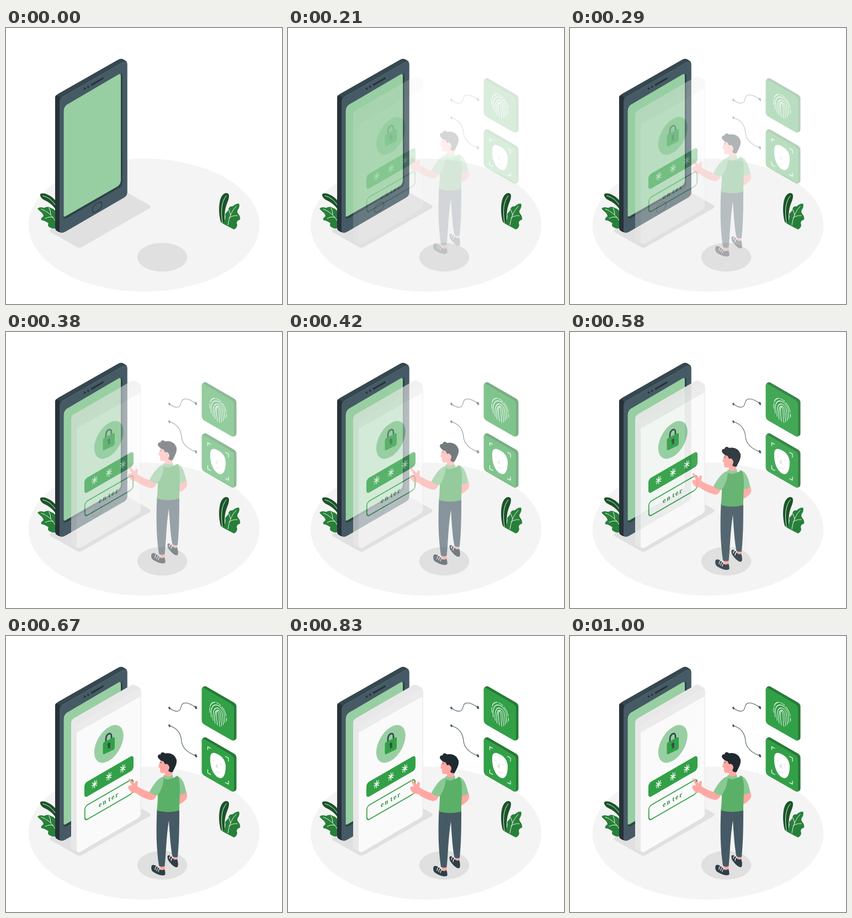
An HTML page that plays this animation: 500x500 px, repeating every 1040 ms.

```html
<!DOCTYPE html>
<html lang="en">
<head>
<meta charset="utf-8">
<title>Sign-in scene</title>
<style>
  html, body { margin: 0; width: 100%; height: 100%; overflow: hidden; background: #fff; }
  svg { display: block; width: 100%; height: 100%; }
  .line { fill: none; stroke-linecap: round; stroke-linejoin: round; }
  .white { stroke: #fff; }
  text { font: bold 11px "Noto Serif", "Liberation Serif", serif; letter-spacing: 2px; }
</style>
</head>
<body>
<svg viewBox="0 0 500 500">
  <defs>
    <g id="card">
      <path fill="#267a36" d="M354.500 98Q355.500 90 362 91L413 120.500Q417.500 123 417.500 128V184Q417.500 188 412 189.500Z"/>
      <path fill="#32a047" d="M354.500 98Q354.500 92 360 95L408 123Q413 126 413 131V186Q413 191.500 408 188.500L360 161Q354.500 158 354.500 152Z"/>
    </g>
    <path id="star" class="line white" stroke-width="1.400" d="M0-6.500V6.500M-5.500 0H5.500M-4.500-4.500L4.500 4.500M-4.500 4.500L4.500-4.500"/>
  </defs>

  <!-- Floor and shadows -->
  <ellipse cx="250" cy="357" rx="209" ry="120.500" fill="#f4f4f4"/>
  <path fill="#e0e0e0" d="M81 365L203 295Q210 292 218 297L260 321Q264 324 259 327L139 396Q133 400 127 396L81 370Q78 368 81 365Z"/>
  <ellipse cx="283" cy="415.300" rx="45.300" ry="26" fill="#e0e0e0"/>

  <!-- Plants -->
  <path fill="#1a5428" d="M62 301C66 297 80 301 90 313V329C84 319 76 315 68 311Q61 306 62 301Z"/>
  <path fill="#278038" d="M57 327Q62 323 69 326Q76 322 81 326Q87 327 91 334V362Q85 365 79 361Q74 358 77 354Q71 349 64 348Q62 345 68 341Q67 336 63 333Q59 330 57 327Z"/>
  <path fill="#1a5428" d="M389.500 352C384 336 384 302 398 299C406 298 405 307 401 316C395 331 396 342 396 354Z"/>
  <path fill="#278038" d="M392 354Q399 348 397 337Q401 332 403 330Q403 322 411 323Q416 318 422 318Q424 322 421 328Q417 332 421 337Q425 342 424 347Q418 349 418 353Q421 361 413 365Z"/>
  <path class="line white" stroke-width=".9" d="M67 304Q81 307 91 323M64 328Q80 334 90 350M78 326Q81 331 81 338M71 345Q78 341 85 343
    M399 304C390 315 389 332 392 352M417 323Q405 335 402 357M404 330Q406 336 407 339M404 344Q411 339 419 340"/>

  <!-- Phone -->
  <path fill="#37474f" d="M89 128Q89 122.500 94 119.500L203 57.500Q208 54.500 213 57L217 59.500Q219.500 61 219.500 66V298Q219 304 214 307L108 368.500Q102 372 97 370L92 367.500Q89 365.500 89 360Z"/>
  <path fill="#263238" d="M89 127Q89 123 91 121.500L99 126Q97 129 97 134V370L92 367.500Q89 365.500 89 360Z"/>
  <path fill="#455a64" d="M97 135Q97 128 103 124.500L212 62Q219.500 58 219.500 66V298Q219.500 304 214 307L108 368.500Q97 374.500 97 364Z"/>
  <path class="line" stroke="#607d8b" stroke-width=".6" d="M99 128Q100 126 103 124.500L212 62"/>
  <path fill="#2f4149" d="M104 151Q104 143 110 139L205 84Q211 81 211 87V279Q211 286 206 289L111 344Q104 347 104 342Z"/>
  <path fill="#98cfa2" d="M104.500 151Q104.500 143 110 139L204 84Q208 82 208 86V276Q208 283 202 287L108 341Q104.500 343 104.500 340Z"/>
  <g fill="#263238">
    <ellipse cx="142.500" cy="110" rx="1.700" ry="2"/>
    <ellipse cx="148.700" cy="106.500" rx="1.700" ry="2"/>
    <path class="line" stroke="#263238" stroke-width="3" d="M155 103L175.500 91.300"/>
  </g>
  <rect class="line" transform="matrix(.866 -.5 0 1 165 324.500)" x="-10" y="-7" width="20" height="14" rx="7" stroke="#263238" stroke-width="1.200"/>

  <g class="fade">
    <!-- Floating screen -->
    <path fill="#e8e8e8" d="M118 158Q118 152 123 149L226 89.500Q230 87 234 89L241 93Q244.500 95 244.500 100V317Q244.500 323 239 326L138 390Q133 393 128 390L121 387Q118 385 118 381Z"/>
    <path fill="#fafafa" d="M128 172V386Q128 394 136 390L239 330Q244.500 326 244.500 320V106Z"/>
    <path fill="#ebebeb" d="M128 175V167Q128 161 133 158L238 97Q244.500 94 244.500 101V109Z"/>
    <path class="line" stroke="#e8e8e8" d="M244 105V320"/>
    <circle transform="matrix(.866 -.5 0 1 186.300 195.500)" r="30.600" fill="#98cfa2"/>
    <path class="line" stroke="#37474f" stroke-width="2.800" d="M181 194V187C181 177 191 173 191 181V189"/>
    <path fill="#32a047" d="M175.500 196Q175.500 193.500 178 192L194.500 183.500Q197 182.500 197 185V202Q197 204.500 195 206L178 214Q175.500 215 175.500 212Z"/>
    <path fill="#37474f" d="M183.500 198Q184 194 187 193Q190 193 188.500 198L189 202L184 204.500L185.500 200Z"/>
    <g transform="matrix(.866 -.5 0 1 186.500 254.500)">
      <rect x="-51.400" y="-13.500" width="102.800" height="27" rx="6" fill="#32a047"/>
      <use href="#star" x="-30" y="-1"/>
      <use href="#star"/>
      <use href="#star" x="29"/>
    </g>
    <g transform="matrix(.866 -.5 0 1 186.500 296.500)">
      <rect class="line" x="-50.500" y="-13" width="101" height="26" rx="6" stroke="#32a047" stroke-width="2"/>
      <text x="0" y="3.500" dx="0 0 2.500" text-anchor="middle" fill="#2b8a3e">enter</text>
    </g>

    <!-- Connectors -->
    <g class="line" stroke="#455a64" stroke-width="1.100">
      <path d="M296 130.500C305 137 315 140 317 129C318.500 119 328 118 344 129.500"/>
      <path d="M296 162.500C311 167 317 178 318 190C319 203 328 211 344 217"/>
    </g>
    <g fill="#455a64">
      <ellipse cx="296" cy="130.500" rx="1.700" ry="2.500" transform="rotate(-25 296 130.500)"/>
      <ellipse cx="344" cy="129.500" rx="2" ry="3" transform="rotate(-25 344 129.500)"/>
      <ellipse cx="296" cy="162.500" rx="1.700" ry="2.500" transform="rotate(-25 296 162.500)"/>
      <ellipse cx="344" cy="217" rx="2" ry="3" transform="rotate(-25 344 217)"/>
    </g>

    <!-- Fingerprint and face cards -->
    <use href="#card"/>
    <use href="#card" y="92.500"/>
    <g class="line white" stroke-width="1.100" transform="matrix(.866 .5 0 1 384 141)">
      <path stroke-dasharray="9 3 16 3" d="M-17 6C-21-26 19-28 18 4"/>
      <path d="M-14 13C-19-21 14-23 14 0V9"/>
      <path d="M-10 17C-14-15 10-17 10 0L11 14"/>
      <path d="M-6 20C-10-11 6-12 6 1Q6 10 8 18"/>
      <path d="M-1 21C-4 10-4-5 0-5S1 10 4 21"/>
    </g>
    <path class="line white" stroke-width="1.100" d="M365.500 206V200.500L370.500 203.500M397.500 218L403 221V227M365.500 242V248L371 251M397.500 265.500L403 268.500V262.500"/>
    <path fill="#fff" d="M370 221C370 213 374 210 381 213C391 217 397 224 398 235C398 249 395 257 389 257.500C379 257 369 241 370 221Z"/>
    <g class="line" stroke="#e0e0e0" stroke-width="1.200">
      <path d="M375 225.500L378 226.500M388 232L391 233.500M381 245Q384 248 387 248"/>
      <path fill="#e0e0e0" stroke="none" d="M383 230L384 240L379 237Z"/>
    </g>
  </g>

  <!-- Visitor -->
  <g class="fade" id="man">
    <g fill="#ffa8a3">
      <path d="M277 414H288L287 427L279 425ZM302 398H311L310 410L303 406Z"/>
      <path d="M314 287L327 282Q330 292 325 297Q320 302 314 305Z"/>
      <path d="M221.500 259Q223 257 226 260L233 267L235 263Q237 261 239 264L238 272Q250 280 262 283L274 284Q271 298 262 297Q246 293 235 284Q226 285 222 276Q220 272 223 271L228 270Z"/>
      <path d="M280 222C279 228 277 232 276 237L279 239Q278 245 281 248L288 248V256Q294 260 301 255L302 228Z"/>
    </g>
    <path fill="#2f3e46" d="M263.500 416.500C266 412.500 271 415.500 276 419Q281 427 287 422Q289 427 288.500 432C284 435.500 275 432 270 429Q261.500 426 263.500 416.500ZM292.500 399C294 395 299 398 302 402Q305 407 310 404Q313 412 311 418C307 421 300 414 297 410Q292 405 292.500 399Z"/>
    <path class="line white" stroke-width="1.100" d="M274 416Q270 418 270 423M277 418Q273 421 273 425M280 421Q276 423 276 427M299 398Q296 400 296 403M302 401Q299 403 299 407"/>
    <path fill="#455a64" d="M273.500 314C272 350 272 382 277 416Q283 419.500 287.500 416.500C290 395 290 366 295 334C297 362 298 382 301.500 399Q306 402 311 400C313.500 375 314 350 314 314Z"/>
    <path fill="#8ac994" d="M286 254C275 257 267 269 260 282Q267 290 277 288L292 263ZM307 253C319 254 323 266 326.500 283Q321 288 313 287Z"/>
    <path fill="#5bb067" d="M286 255Q298 261 311 253C318 266 314 290 314 316Q294 321.500 273.500 316C274.500 304 275 296 275 288C281 280 285 270 286 255Z"/>
    <path fill="#8ac994" d="M286 251Q294 258 302 251L303 256Q294 263 285 257Z"/>
    <path fill="#1f2a30" d="M277 222C273 218 276 213 280 214.500C280 209.500 286 209.500 288 212.500C297 210.500 306 214 309 224C310 233 305 239 302 246Q298 248 294 244L296 239Q296 233 292 233L288 232L285.500 227Q280 226 277 222Z"/>
    <ellipse cx="290.500" cy="236.500" rx="3.600" ry="5" fill="#ffa8a3" transform="rotate(15 290.500 236.500)"/>
    <path class="line" stroke="#263238" stroke-width=".9" d="M279.800 229.500L281.800 229"/>
  </g>
</svg>
<script>
  const LOOP = 1040, STEPS = 24, DROP = 30;
  const fades = document.querySelectorAll('.fade');
  const man = document.getElementById('man');

  const bezier = (a, b, s) => 3 * (1 - s) ** 2 * s * a + 3 * (1 - s) * s * s * b + s ** 3;

  // Cubic easing with a slight overshoot near the end.
  function ease(x) {
    if (x >= 1) return 1;
    let low = 0, high = 1;
    for (let i = 0; i < 24; i++) {
      const mid = (low + high) / 2;
      if (bezier(.36, .5, mid) < x) low = mid; else high = mid;
    }
    return bezier(-.01, 1.38, low);
  }

  function draw(now) {
    const t = now % LOOP;
    // The motion advances in 24 steps per second.
    const step = Math.min(STEPS, Math.floor((t + 5) * STEPS / 1000));
    const p = ease((step + .5) / STEPS);
    fades.forEach(g => g.setAttribute('opacity', Math.max(0, Math.min(1, p))));
    man.setAttribute('transform', `translate(0 ${DROP * (p - 1)})`);
    requestAnimationFrame(draw);
  }
  draw(performance.now());
</script>
</body>
</html>
```
